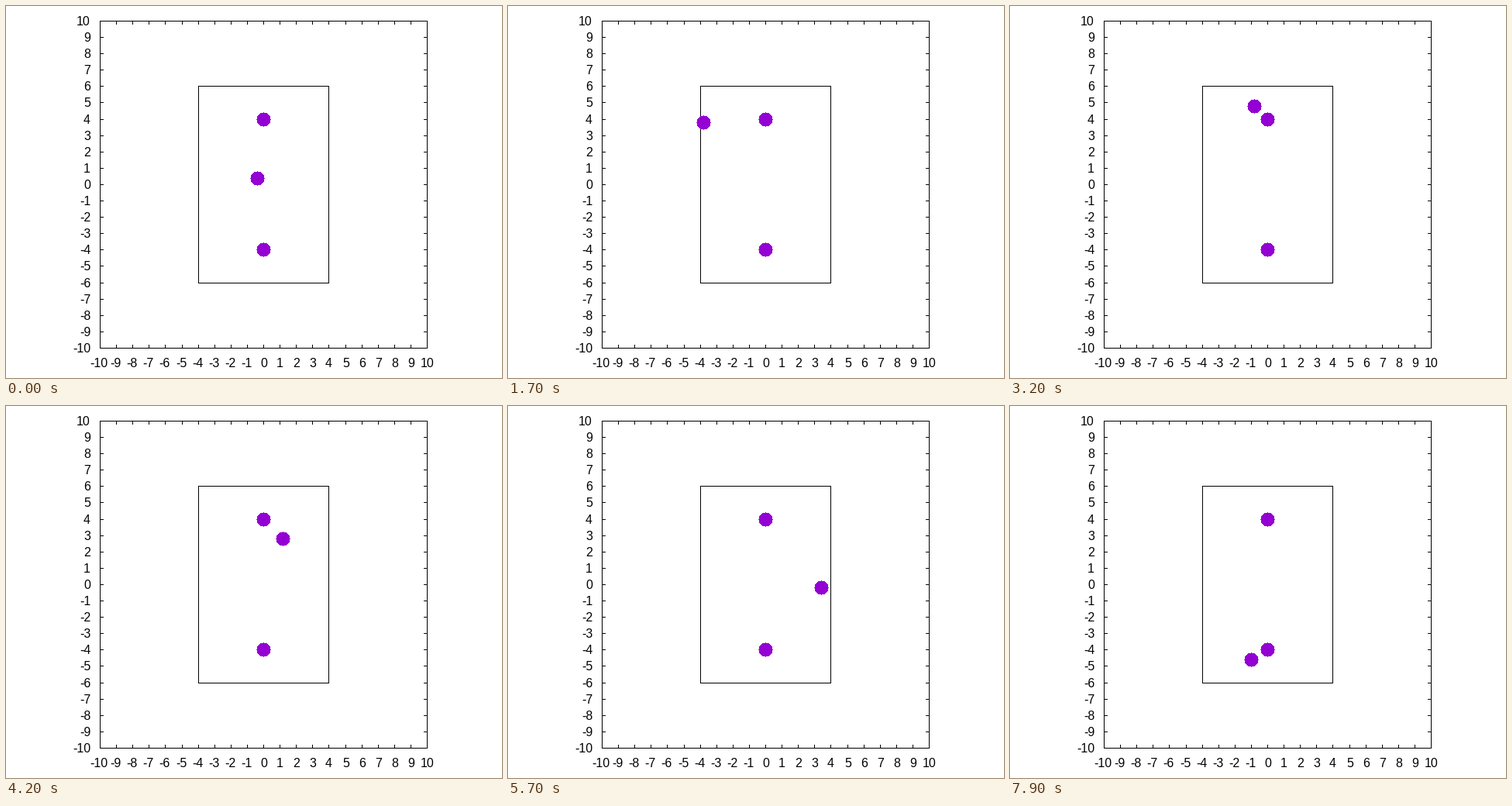
Animation, 640 px wide and 480 px high, one loop 8000 ms. Source, as a matplotlib script:

```python
import numpy as np
import matplotlib.pyplot as plt
from matplotlib.animation import FuncAnimation
from matplotlib.patches import Polygon, Rectangle

W, H, DPI = 640, 480, 100
LEFT, BOTTOM, SIZE = 121, 441, 422    # plot frame in pixels
UNIT = SIZE / 20                      # pixels per axis unit
TICK = 4
RADIUS = 9
WALL_X, WALL_Y = 3.8, 5.8             # where the ball turns back
STEPS, INTERVAL = 80, 100

plt.rcParams["font.family"] = "Liberation Sans"
plt.rcParams["text.hinting"] = "default"

fig = plt.figure(figsize=(W / DPI, H / DPI), dpi=DPI, facecolor="white")
ax = fig.add_axes([0, 0, 1, 1])
ax.set(xlim=(0, W), ylim=(H, 0))
ax.axis("off")


def px(x):
    return LEFT + int(np.floor((x + 10) * UNIT + 0.5))


def py(y):
    return BOTTOM - int(np.floor((y + 10) * UNIT + 0.5))


def bar(x0, y0, x1, y1):
    """Fill the pixels from (x0, y0) to (x1, y1), both included."""
    ax.add_patch(Rectangle((x0, y0), x1 - x0 + 1, y1 - y0 + 1,
                           fc="black", lw=0, snap=False))


def outline(x0, y0, x1, y1):
    bar(x0, y0, x1, y0)
    bar(x0, y1, x1, y1)
    bar(x0, y0, x0, y1)
    bar(x1, y0, x1, y1)


def disc():
    """Stepped outline of a hard-edged disc, one step per pixel row."""
    right = []
    for dy in range(-RADIUS, RADIUS + 1):
        half = int(np.sqrt(RADIUS**2 - dy**2))
        right += [(half + 1, dy), (half + 1, dy + 1)]
    left = [(1 - x, y) for x, y in reversed(right)]
    return np.array(right + left)


DISC = disc()


def add_dot(x, y):
    dot = Polygon(DISC + (px(x), py(y)), fc="#9400d3", lw=0, snap=False, zorder=3)
    return ax.add_patch(dot)


def bounce(u, wall):
    """Fold a straight run into the range -wall to wall."""
    return abs((u - wall) % (4 * wall) - 2 * wall) - wall


def ball_at(i):
    run = (i + 2) / 5
    return round(bounce(-run, WALL_X), 6), round(bounce(run, WALL_Y), 6)


def label(x, y, text):
    """Put text with its pen origin on whole pixels."""
    ax.text(x, y, text, size=16 * 72 / DPI, ha="left", va="baseline", color="black")


top, right = BOTTOM - SIZE, LEFT + SIZE
outline(LEFT, top, right, BOTTOM)
outline(px(-4), py(6), px(4), py(-6))

for v in range(-10, 11):
    x, y, text = px(v), py(v), str(v)
    bar(x, top, x, top + TICK)
    bar(x, BOTTOM - TICK, x, BOTTOM)
    bar(LEFT, y, LEFT + TICK, y)
    bar(right - TICK, y, right, y)
    label(x - round(4.2 * len(text)), 466, text)
    # digits advance 9 px, the minus sign 5 px
    label(109 - 9 * len(text) + 4 * (v < 0), y + 6, text)

add_dot(0, 4)
add_dot(0, -4)
ball = add_dot(*ball_at(0))


def update(i):
    x, y = ball_at(i)
    ball.set_xy(DISC + (px(x), py(y)))
    return [ball]


anim = FuncAnimation(fig, update, frames=STEPS, interval=INTERVAL,
                     repeat=True, repeat_delay=0)
plt.show()
```
